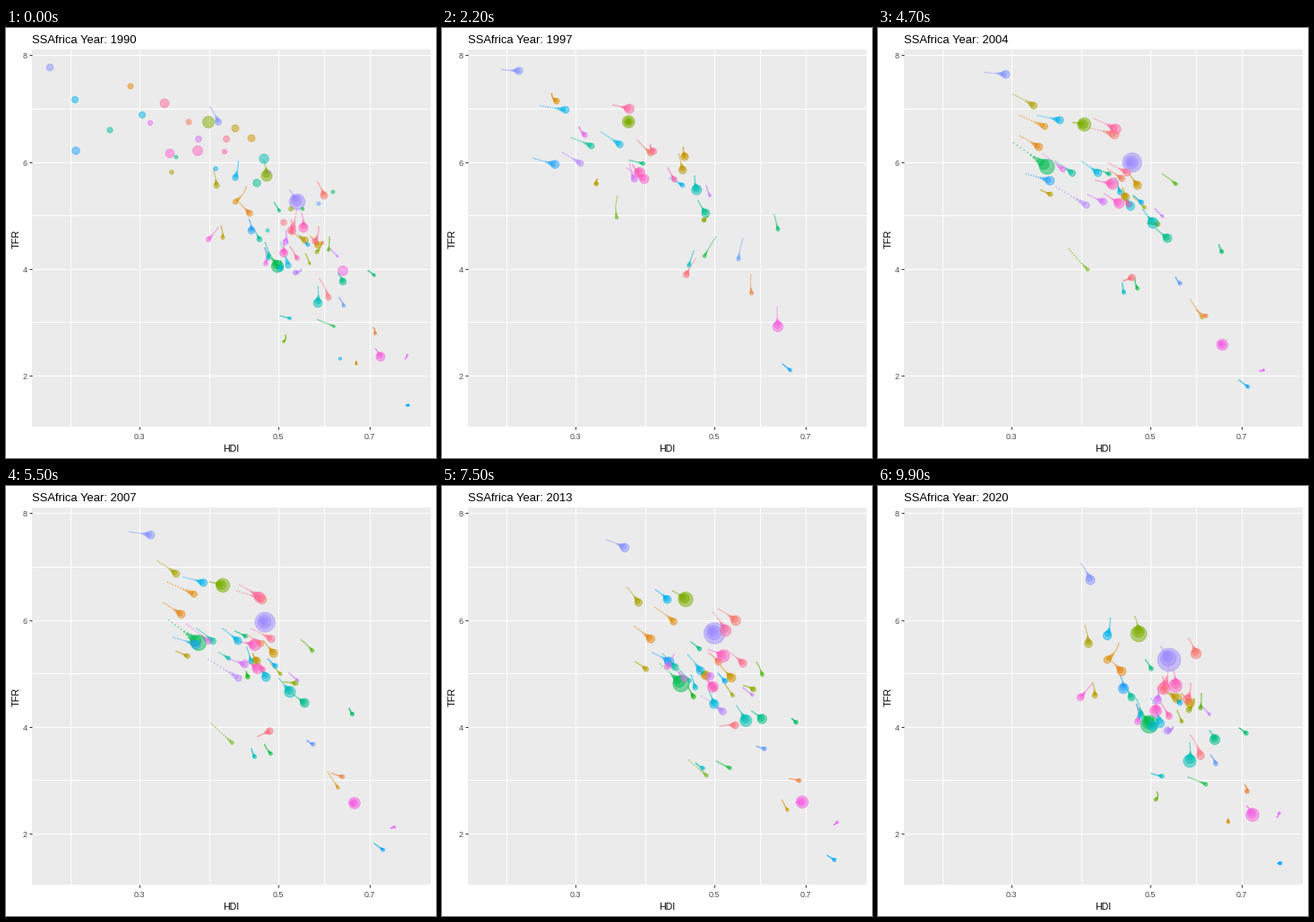
Animation, 480 px wide and 480 px high, one loop 10 s. Source, as a matplotlib script:

```python
import numpy as np
import matplotlib.pyplot as plt
from matplotlib.animation import FuncAnimation

SIZE, FRAMES, STEP, WAKE = 480, 100, 100, 10
PT = 0.75  # points per pixel at 96 dpi
LEFT, TOP, RIGHT, BOTTOM = 29, 24, 474, 445
COUNTRIES, POP_MAX, GROWTH = 48, 206, 0.75
T = np.arange(FRAMES)

plt.rcParams["font.family"] = "Liberation Sans"


def hdi_x(hdi):
    return 304 + 303.4 * np.log(hdi / 0.5)


def tfr_y(tfr):
    return 30.22 + 59.65 * (8 - tfr)


def hcl(hue, chroma=100, light=65):
    """Polar LUV to sRGB, the usual evenly spaced hue palette."""
    h = np.radians(hue)
    u = chroma * np.cos(h) / (13 * light) + 0.1978
    v = chroma * np.sin(h) / (13 * light) + 0.4683
    y = ((light + 16) / 116) ** 3
    x = 9 * y * u / (4 * v)
    z = 3 * y / v - x / 3 - 5 * y
    rgb = np.array([3.2406 * x - 1.5372 * y - 0.4986 * z,
                    -0.9689 * x + 1.8758 * y + 0.0415 * z,
                    0.0557 * x - 0.2040 * y + 1.0570 * z]).clip(0, 1)
    return np.where(rgb > 0.0031308, 1.055 * rgb ** (1 / 2.4) - 0.055, 12.92 * rgb)


tracks = []


def track(pop, *points, start=0):
    """Smooth path through points evenly spaced in time; pop is the final value."""
    s = (T - start) / (FRAMES - 1 - start)
    knots = np.linspace(0, 1, len(points))
    x, y = (np.polyval(np.polyfit(knots, c, len(points) - 1), s) for c in zip(*points))
    people = pop * np.exp(GROWTH * (T / (FRAMES - 1) - 1))
    size = 1 + 11 * np.sqrt(people / POP_MAX)
    hue = 15 + 360 * len(tracks) / COUNTRIES
    tracks.append((start, x, y, size, (*hcl(hue), 0.5)))


# One bubble per country, in palette order.
track(33, (208, 106), (308, 137), (355, 187), start=30)
track(12, (204, 105), (250, 153), (299, 187), (319, 227))
track(2.4, (353, 240), (352, 311), (389, 327), (412, 341))
track(21, (143, 112), (214, 156), (272, 207), start=30)
track(12, (139, 65), (148, 93), (240, 137), (256, 194))
track(0.6, (343, 295), (380, 352), (391, 375), start=33)
track(26, (274, 123), (277, 157), (312, 202), (348, 242))
track(26, (256, 112), (272, 174), (286, 204), (334, 237))
track(4.8, (185, 161), (178, 179), (217, 197), (242, 234))
track(16, (140, 69), (208, 115), (235, 176), start=33)
track(0.9, (280, 184), (317, 223), (339, 263), start=33)
track(5.5, (318, 202), (297, 217), (338, 223), (347, 250))
track(90, (226, 105), (214, 105), (259, 118), (291, 165))
track(1, (196, 188), (221, 256), (286, 315), (310, 350), start=12)
track(1.4, (311, 159), (352, 198), (360, 248), start=33)
track(3.5, (268, 207), (280, 234), (303, 266), start=49)
track(1.2, (331, 202), (287, 273), (308, 308), (366, 333))
track(115, (135, 117), (246, 201), (303, 266), start=33)
track(2.2, (365, 183), (379, 238), (391, 260), (411, 276))
track(2.4, (190, 144), (240, 156), (279, 175), (305, 204))
track(31, (280, 173), (306, 220), (347, 252), (376, 283))
track(13, (116, 114), (190, 144), (248, 189), (283, 236))
track(2, (238, 186), (275, 216), (294, 254), start=49)
track(54, (288, 146), (292, 197), (330, 247), (348, 307))
track(2.1, (292, 226), (273, 280), (284, 310), (317, 324))
track(5, (262, 156), (278, 210), (293, 257), start=30)
track(28, (263, 170), (299, 231), (306, 268), start=33)
track(19, (152, 97), (220, 144), (276, 190), (315, 265))
track(20, (77, 80), (168, 96), (240, 117), (256, 167))
track(4.6, (234, 157), (281, 184), (309, 210), (337, 242))
track(1.3, (373, 369), (399, 390), (431, 413), (449, 421))
track(31, (78, 137), (155, 160), (237, 187), (274, 226))
track(2.5, (349, 196), (331, 274), (352, 291), (377, 310))
track(24, (49, 44), (110, 49), (186, 61), (237, 105))
track(206, (281, 150), (301, 161), (325, 194), start=43)
track(13, (133, 138), (210, 184), (302, 243), (323, 273), start=11)
track(0.2, (294, 161), (306, 198), (337, 226), (370, 255))
track(17, (215, 124), (228, 182), (286, 206), (312, 239))
track(0.1, (424, 383), (438, 378), (448, 365), start=33)
track(8, (161, 106), (176, 134), (252, 196), (290, 263))
track(59, (376, 271), (378, 347), (396, 353), (418, 367))
track(11, (259, 188), (245, 212), (226, 236), start=66)
track(44, (183, 140), (246, 181), (294, 215), (310, 251))
track(60, (214, 137), (236, 168), (299, 183), (332, 223))
track(8.3, (244, 138), (268, 182), (296, 216), (325, 257))
track(46, (177, 84), (233, 98), (304, 143), (319, 226))
track(18, (246, 124), (250, 147), (320, 185), (345, 238))
track(15, (310, 217), (272, 282), (312, 268), (360, 301))

fig = plt.figure(figsize=(5, 5), dpi=96, facecolor="white")
ax = fig.add_axes([0, 0, 1, 1])
ax.set(xlim=(0, SIZE), ylim=(SIZE, 0))
ax.axis("off")


def label(x, y, text, px, color="black", **kw):
    return ax.text(x, y, text, fontsize=px * PT, color=color, **kw)


def vline(x, y0, y1, color):
    ax.vlines(x, y0, y1, color=color, linewidth=PT, zorder=2)


def hline(y, x0, x1, color):
    ax.hlines(y, x0, x1, color=color, linewidth=PT, zorder=2)


ax.add_patch(plt.Rectangle((LEFT, TOP), RIGHT - LEFT, BOTTOM - TOP, color="#EBEBEB", lw=0))

# Minor lines sit halfway between major ones on the log axis.
majors = (0.3, 0.5, 0.7)
minors = np.sqrt([0.3 ** 3 / 0.5, 0.3 * 0.5, 0.5 * 0.7])
vline(hdi_x(np.array([*majors, *minors])), TOP, BOTTOM, "white")
hline(tfr_y(np.arange(2, 9)), LEFT, RIGHT, "white")

for h in majors:
    vline(hdi_x(h), BOTTOM, BOTTOM + 3, "#333333")
    label(hdi_x(h), 459, str(h), 9, "#4D4D4D", ha="center")
for n in range(2, 9, 2):
    hline(tfr_y(n), LEFT - 3, LEFT, "#333333")
    label(24, tfr_y(n) + 4, str(n), 9, "#4D4D4D", ha="right")
label(251.5, 473, "HDI", 10.5, ha="center")
label(12, 235.5, "TFR", 11, ha="center", va="center", rotation=90)
title = label(29, 17, "", 13)

dots = ax.scatter([], [], linewidths=PT, zorder=3)


def update(i):
    pos, area, colors = [], [], []
    for age in range(WAKE, -1, -1):
        t = (i - age) % FRAMES
        shrink = (1 - age / (WAKE + 1)) ** 4
        for start, x, y, size, rgba in tracks:
            if t >= start:
                pos.append((x[t], y[t]))
                width = max(2.13 * size[t] * shrink, 0.7)
                area.append((width * PT) ** 2)
                colors.append(rgba)
    dots.set_offsets(pos)
    dots.set_sizes(area)
    dots.set_facecolor(colors)
    dots.set_edgecolor(colors)
    title.set_text(f"SSAfrica Year: {round(1990 + 30 * i / (FRAMES - 1))}")
    return dots, title


anim = FuncAnimation(fig, update, frames=FRAMES, interval=STEP, repeat=True, repeat_delay=0)
plt.show()
```
